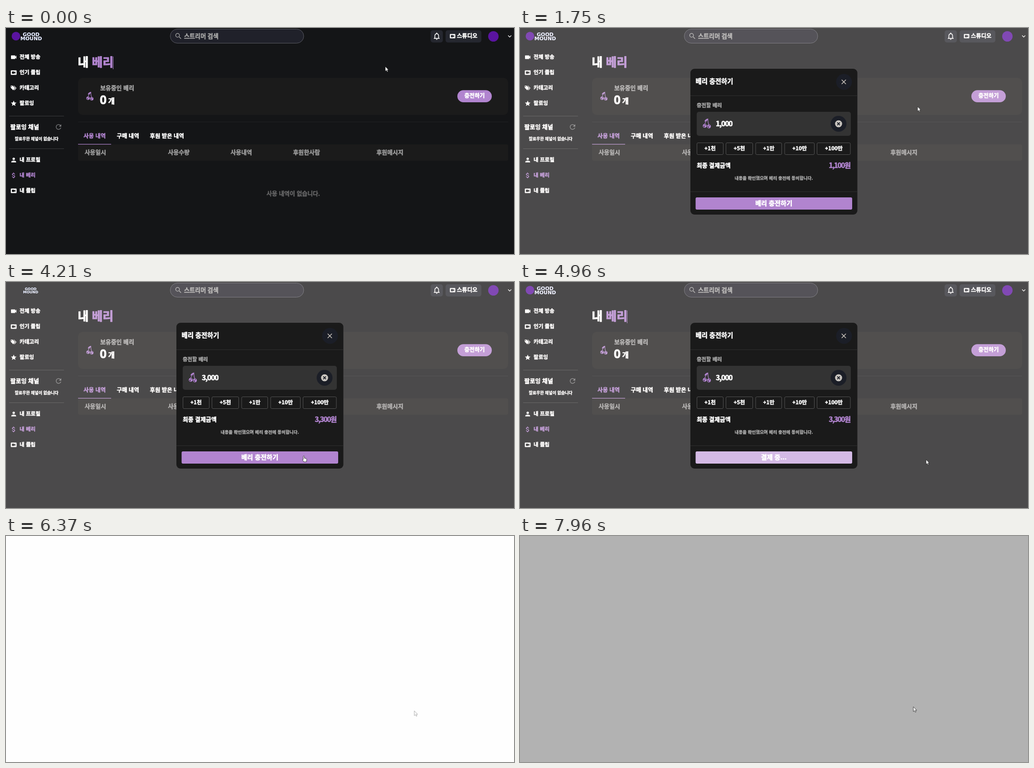
These frames come from a looping animation (1121 px wide and 499 px high, 8 s). An HTML page:

```html
<!DOCTYPE html>
<html lang="ko">
<head>
<meta charset="utf-8">
<title>내 베리</title>
<style>
html, body { margin: 0; width: 100%; height: 100%; overflow: hidden; background: #141517; }
svg { display: block; width: 1121px; height: 499px; color: #fff; }
text {
  font-family: "Noto Sans CJK KR", "Noto Sans CJK", "Noto Sans", sans-serif;
  font-weight: 900;
  fill: currentColor;
  stroke: currentColor;
  stroke-width: .045em;
  stroke-linejoin: round;
}
.mid { text-anchor: middle; }
.end { text-anchor: end; }
.lilac { color: #b184cf; }
.grey { color: #a3a3a3; }
.num { letter-spacing: -1.2px; }
.side { font-size: 11.6px; }
.tab { font-size: 12.4px; }
.head { font-size: 12.9px; color: #989898; }
.chip { font-size: 11.9px; }
.icon { fill: currentColor; }
.line { fill: none; stroke: currentColor; }
.brand { font: 700 11px "DejaVu Sans", sans-serif; fill: #f0ecfb; stroke: none; }

.anim, .step { animation: 8s linear infinite; }
.step { animation-timing-function: step-end; }

#word { animation-name: word; transform-origin: 52px 19px; filter: drop-shadow(.7px .4px 0 #4f8fc4); }
@keyframes word {
  0%, 51.7% { transform: none; }
  51.75%, 54% { transform: scale(.7); }
  58.5%, 100% { transform: none; }
}
#mark { animation-name: mark; transform-origin: 22px 18px; }
@keyframes mark {
  0%, 51.7% { opacity: 1; transform: none; }
  51.75%, 56.5% { opacity: 0; transform: scale(.4); }
  62%, 100% { opacity: 1; transform: none; }
}
#caret { animation-name: caret; }
@keyframes caret {
  0%, 58%, 71.25% { opacity: 1; }
  7.6%, 64.6%, 77.87% { opacity: 0; }
  100% { opacity: 0; }
}
#charge { animation-name: charge; }
@keyframes charge {
  0%, 18.9% { fill: #b184cf; }
  7% { fill: #c7a4dd; }
}
#veil { animation-name: veil; }
@keyframes veil {
  0%, 16.6% { opacity: 0; }
  17.5% { opacity: .15; }
  20.5%, 100% { opacity: 1; }
}
#modal { animation-name: modal; transform-origin: 560px 251px; }
@keyframes modal {
  0%, 16.2% { opacity: 0; transform: scale(.95); }
  17.5% { opacity: .67; transform: scale(.964); }
  18.9% { opacity: 1; transform: scale(.983); }
  20.5%, 100% { opacity: 1; transform: none; }
}
#press { animation-name: press; }
@keyframes press {
  0%, 35.6% { opacity: 0; }
  36.2% { opacity: .25; }
  39.5% { opacity: 0; }
  41% { opacity: 0; }
  41.5% { opacity: .25; }
  44.5%, 100% { opacity: 0; }
}
#one { animation-name: one; }
#two { animation-name: two; }
#three { animation-name: three; }
@keyframes one { 0% { opacity: 1; } 36.2%, 100% { opacity: 0; } }
@keyframes two { 0%, 41.5%, 100% { opacity: 0; } 36.2% { opacity: 1; } }
@keyframes three { 0% { opacity: 0; } 41.5%, 100% { opacity: 1; } }

#pay { animation-name: pay; }
@keyframes pay { 0% { fill: #b184cf; } 58%, 100% { fill: #d4bae5; } }
#ready { animation-name: ready; }
#busy { animation-name: busy; }
@keyframes ready { 0% { opacity: 1; } 58%, 100% { opacity: 0; } }
@keyframes busy { 0% { opacity: 0; } 58%, 100% { opacity: 1; } }

#blank { animation-name: blank; }
@keyframes blank {
  0% { opacity: 0; fill: #fefefe; }
  79.62% { opacity: 1; fill: #fefefe; }
  86.12%, 100% { opacity: 1; fill: #b2b2b2; }
}
#cursor { animation-name: cursor; }
@keyframes cursor {
  0%, .9% { transform: translate(837px, 85px); animation-timing-function: ease-in-out; }
  8.4% { transform: translate(1030px, 153px); }
  18.4% { transform: translate(1030px, 153px); animation-timing-function: ease-in; }
  21.875% { transform: translate(879px, 173px); }
  23.4% { transform: translate(671px, 215px); }
  24.25%, 26.5% { transform: translate(602px, 222px); animation-timing-function: ease-in-out; }
  32%, 41.5% { transform: translate(426px, 265px); animation-timing-function: ease-in-out; }
  46.5% { transform: translate(560px, 431px); animation-timing-function: ease-in-out; }
  50.9%, 58% { transform: translate(657px, 384px); animation-timing-function: ease-in-out; }
  61.4%, 62% { transform: translate(896px, 392px); }
  66%, 99.49% { transform: translate(901px, 386px); }
  99.5%, 100% { transform: translate(868px, 377px); }
}
#arrow { animation-name: arrow; }
@keyframes arrow {
  0%, 15.6%, 42.2%, 58.6%, 86.12%, 100% { opacity: 1; }
  7%, 31%, 50.2% { opacity: 0; }
  79.62% { opacity: .45; }
}
#hand { animation-name: hand; }
@keyframes hand {
  0%, 15.6%, 42.2%, 58.6%, 100% { opacity: 0; }
  7%, 31%, 50.2% { opacity: 1; }
}
</style>
</head>
<body>
<svg viewBox="0 0 1121 499">
  <defs>
    <!-- icons sit on a 24 unit grid, centred on 0,0 -->
    <path id="cam" transform="translate(-12 -12)" d="M17 10.5V7a1 1 0 0 0-1-1H4a1 1 0 0 0-1 1v10a1 1 0 0 0 1 1h12a1 1 0 0 0 1-1v-3.5l4 4v-11z"/>
    <path id="clip" fill-rule="evenodd" d="M-8-8H8a2 2 0 0 1 2 2V6a2 2 0 0 1-2 2H-8a2 2 0 0 1-2-2V-6a2 2 0 0 1 2-2zM-6-4V4H2V1L6 4V-4L2-1V-4z"/>
    <path id="tag" fill-rule="evenodd" d="M-10-8H-3L6 1 -1 9 -10 0zM-7-6a1.5 1.5 0 1 0 .1 0zM0-8H2L11 1 4 9 2 8 8 1z"/>
    <path id="star" transform="translate(-12 -12)" d="M12 17.27 18.18 21l-1.64-7.03L22 9.24l-7.19-.61L12 2 9.19 8.63 2 9.24l5.46 4.73L5.82 21z"/>
    <path id="person" transform="translate(-12 -12)" d="M12 12a4 4 0 1 0 0-8 4 4 0 0 0 0 8zm0 2c-2.67 0-8 1.34-8 4v2h16v-2c0-2.66-5.33-4-8-4z"/>
    <path id="dollar" transform="translate(-12 -12)" d="M11.8 10.9c-2.27-.59-3-1.2-3-2.15 0-1.09 1.01-1.85 2.7-1.85 1.78 0 2.44.85 2.5 2.1h2.21c-.07-1.72-1.12-3.3-3.21-3.81V3h-3v2.16c-1.94.42-3.5 1.68-3.5 3.61 0 2.31 1.91 3.46 4.7 4.13 2.5.6 3 1.48 3 2.41 0 .69-.49 1.79-2.7 1.79-2.06 0-2.87-.92-2.98-2.1h-2.2c.12 2.19 1.76 3.42 3.68 3.83V21h3v-2.15c1.95-.37 3.5-1.5 3.5-3.55 0-2.84-2.43-3.81-4.7-4.4z"/>
    <path id="search" transform="translate(-12 -12)" d="M15.5 14h-.79l-.28-.27A6.47 6.47 0 0 0 16 9.5 6.5 6.5 0 1 0 9.5 16c1.61 0 3.09-.59 4.23-1.57l.27.28v.79l5 4.99L20.49 19zm-6 0a4.5 4.5 0 1 1 0-9 4.5 4.5 0 0 1 0 9z"/>
    <path id="refresh" transform="translate(-12 -12)" d="M17.65 6.35A7.96 7.96 0 0 0 12 4a8 8 0 1 0 7.73 10h-2.08A6 6 0 1 1 12 6c1.66 0 3.14.69 4.22 1.78L13 11h7V4z"/>
    <path id="bell" transform="translate(-12 -12)" d="M12 22c1.1 0 2-.9 2-2h-4c0 1.1.9 2 2 2zm6-6v-5c0-3.07-1.63-5.64-4.5-6.32V4a1.5 1.5 0 0 0-3 0v.68C7.64 5.36 6 7.92 6 11v5l-2 2v1h16v-1zm-2 1H8v-6c0-2.48 1.51-4.5 4-4.5s4 2.02 4 4.5z"/>
    <g id="cherry">
      <path class="line" stroke-width="1.2" d="M10.5 1Q5.5 6 4.5 11M10.5 1Q10.5 8 12.5 12"/>
      <path class="icon" d="M11.5 0Q5 .5 3.5 6Q9 6 11.5 0z"/>
      <circle class="icon" cx="4.2" cy="14.5" r="3.9"/>
      <circle class="icon" cx="12.6" cy="15.7" r="3.9"/>
      <path class="line" stroke-width="1.2" style="color:#1b1b1b" d="M2.2 14.5a2 2 0 0 0 2 2M10.6 15.7a2 2 0 0 0 2 2M4.5 12l.8 1.5M12.9 13.2l.8 1.5"/>
    </g>
    <path id="cross" class="line" d="M-1-1L1 1M1-1L-1 1"/>
  </defs>

  <rect width="1121" height="499" fill="#141517"/>

  <!-- top bar -->
  <circle id="mark" class="anim" cx="22" cy="18" r="9.5" fill="#5a14a0"/>
  <g id="word" class="anim">
    <text class="brand mid" x="55.5" y="17.5">GOOD</text>
    <text class="brand mid" x="55.5" y="27">MOUND</text>
  </g>
  <rect x="362.5" y="2.5" width="294.5" height="31" rx="15.5" fill="#20212a" stroke="#5b5c64"/>
  <g class="grey">
    <use href="#search" class="icon" transform="translate(380.5 18) scale(.75)"/>
    <text x="393" y="22.5" font-size="13.1">스트리머 검색</text>
  </g>
  <g fill="#25272f">
    <rect x="937" y="5" width="27" height="27" rx="5"/>
    <rect x="970" y="5" width="79" height="27" rx="5"/>
  </g>
  <use href="#bell" class="icon" transform="translate(950.5 18) scale(.82)"/>
  <use href="#clip" class="icon" transform="translate(985.5 18) scale(.6)"/>
  <text x="995" y="22.3" font-size="12.3">스튜디오</text>
  <circle cx="1075.5" cy="18.5" r="11.5" fill="#5a14a0"/>
  <path class="line" stroke-width="1.3" d="M1108 16.5l3.5 3.5 3.5-3.5"/>

  <!-- side menu -->
  <g class="side">
    <use href="#cam" class="icon" transform="translate(17 64.5) scale(.66)"/>
    <text x="30" y="68.2">전체 방송</text>
    <use href="#clip" class="icon" transform="translate(17 98.5) scale(.64)"/>
    <text x="30" y="102.2">인기 클립</text>
    <use href="#tag" class="icon" transform="translate(16.5 132) scale(.6)"/>
    <text x="30" y="136.2">카테고리</text>
    <use href="#star" class="icon" transform="translate(17 166.5) scale(.62)"/>
    <text x="30" y="170">팔로잉</text>
    <use href="#person" class="icon" transform="translate(17 291.5) scale(.66)"/>
    <text x="30" y="295.2">내 프로필</text>
    <g class="lilac">
      <use href="#dollar" class="icon" transform="translate(17 325.5) scale(.68)"/>
      <text x="30" y="329.2">내 베리</text>
    </g>
    <use href="#clip" class="icon" transform="translate(17 359.5) scale(.64)"/>
    <text x="30" y="363">내 클립</text>
  </g>
  <path stroke="#3b3c3e" d="M7 194.5H128M7 266.5H128"/>
  <text x="9.5" y="222.8" font-size="13">팔로잉 채널</text>
  <use href="#refresh" class="icon" style="color:#77787a" transform="translate(116 218.5) scale(.75)"/>
  <text class="mid" x="67.5" y="247.6" font-size="9">팔로우한 채널이 없습니다</text>

  <!-- page -->
  <text x="158.5" y="84.5" font-size="25.8">내 <tspan class="lilac">베리</tspan></text>
  <rect id="caret" class="step" x="236" y="63" width="1" height="28" fill="#b184cf"/>
  <rect x="159" y="110" width="949" height="82" rx="10" fill="#1b1b1b"/>
  <use href="#cherry" class="lilac" transform="translate(177 141) scale(.97)"/>
  <text class="grey" x="208" y="136.8" font-size="12.9">보유중인 베리</text>
  <text x="207" y="168" font-size="25.5">0</text>
  <text x="225.5" y="167" font-size="15.8">개</text>
  <rect id="charge" class="step" x="996" y="137.3" width="76" height="26.7" rx="13.35"/>
  <text class="mid" x="1034" y="154" font-size="12.2">충전하기</text>
  <path stroke="#212224" d="M159 207.5H1108"/>
  <g class="tab">
    <text class="lilac" x="171" y="242.6">사용 내역</text>
    <text x="244.5" y="242.6">구매 내역</text>
    <text x="317.5" y="242.6">후원 받은 내역</text>
  </g>
  <rect x="159" y="257" width="949" height="36" rx="3" fill="#1b1b1b"/>
  <rect x="159" y="256" width="73" height="1.2" fill="#b184cf"/>
  <g class="head">
    <text x="173.5" y="278.8">사용일시</text>
    <text x="357.5" y="278.8">사용수량</text>
    <text x="495.5" y="278.8">사용내역</text>
    <text x="633.5" y="278.8">후원한사람</text>
    <text x="817.5" y="278.8">후원메시지</text>
  </g>
  <text class="mid" x="634" y="370" font-size="12.9" style="color:#626263">사용 내역이 없습니다.</text>

  <rect id="veil" class="anim" width="1121" height="499" fill="#fff4f0" fill-opacity=".235"/>

  <!-- dialog -->
  <g id="modal" class="anim">
    <rect x="376" y="90" width="368.5" height="322" rx="9" fill="#1a1a1a"/>
    <text x="387.5" y="123.3" font-size="14.3">베리 충전하기</text>
    <circle cx="715" cy="119" r="17.5" fill="#1b1e27"/>
    <use href="#cross" style="color:#d2ccc4" stroke-width=".32" transform="translate(714.5 119) scale(4.7)"/>
    <path stroke="#303030" d="M376 149.5H744.5M376 361.5H744.5"/>
    <text class="grey" x="390" y="175.2" font-size="11.4">충전할 베리</text>
    <rect x="390" y="185" width="340" height="53" rx="5" fill="#333"/>
    <use href="#cherry" class="lilac" transform="translate(403 200) scale(1.1)"/>
    <circle cx="703" cy="211.5" r="17.5" fill="#1b1e27"/>
    <circle cx="703" cy="211.5" r="7.8" fill="#c9c5c0"/>
    <use href="#cross" style="color:#1b1e27" stroke-width=".6" transform="translate(703 211.5) scale(3)"/>

    <g class="num">
      <g id="one" class="step">
        <text x="432" y="216.5" font-size="15.8">1,000</text>
        <text class="end lilac" x="729" y="308.7" font-size="15.2">1,100원</text>
      </g>
      <g id="two" class="step">
        <text x="432" y="216.5" font-size="15.8">2,000</text>
        <text class="end lilac" x="729" y="308.7" font-size="15.2">2,200원</text>
      </g>
      <g id="three" class="step">
        <text x="432" y="216.5" font-size="15.8">3,000</text>
        <text class="end lilac" x="729" y="308.7" font-size="15.2">3,300원</text>
      </g>
    </g>

    <g fill="none" stroke="#555">
      <rect x="390.5" y="253.5" width="58" height="26" rx="2.5"/>
      <rect x="454.5" y="253.5" width="59" height="26" rx="2.5"/>
      <rect x="520" y="253.5" width="57.5" height="26" rx="2.5"/>
      <rect x="584" y="253.5" width="65.5" height="26" rx="2.5"/>
      <rect x="655.5" y="253.5" width="73.5" height="26" rx="2.5"/>
    </g>
    <rect id="press" class="anim" x="391" y="254" width="57" height="25" rx="2" fill="#fff"/>
    <g class="chip mid">
      <text x="419.5" y="270.4">+1천</text>
      <text x="484" y="270.4">+5천</text>
      <text x="549" y="270.4">+1만</text>
      <text x="617" y="270.4">+10만</text>
      <text x="692.5" y="270.4">+100만</text>
    </g>
    <text x="390" y="308" font-size="12.9">최종 결제금액</text>
    <text class="mid" x="560" y="335" font-size="9.6" style="color:#aaa">내용을 확인했으며 베리 충전에 동의합니다.</text>
    <rect id="pay" class="step" x="387.5" y="374" width="345.5" height="27" rx="3"/>
    <text id="ready" class="step mid" x="560" y="392.3" font-size="14.1">베리 충전하기</text>
    <text id="busy" class="step mid" x="560" y="392.3" font-size="14.1">결제 중...</text>
  </g>

  <rect id="blank" class="step" width="1121" height="499"/>

  <g id="cursor" class="anim" fill="#fff" stroke="#1a1a1a" stroke-width=".8" stroke-linejoin="round">
    <path id="arrow" class="step" d="M0 0V10.6L2.5 8.4 4.2 12 6 11.2 4.4 7.7H7.3z"/>
    <path id="hand" class="step" d="M-1 1.2a1.2 1.2 0 0 1 2.4 0V5l4 .8q1.4.4 1.2 2L6 13H0L-2.6 8.6q-.2-1.4 1.6-.6z"/>
  </g>
</svg>
</body>
</html>
```
